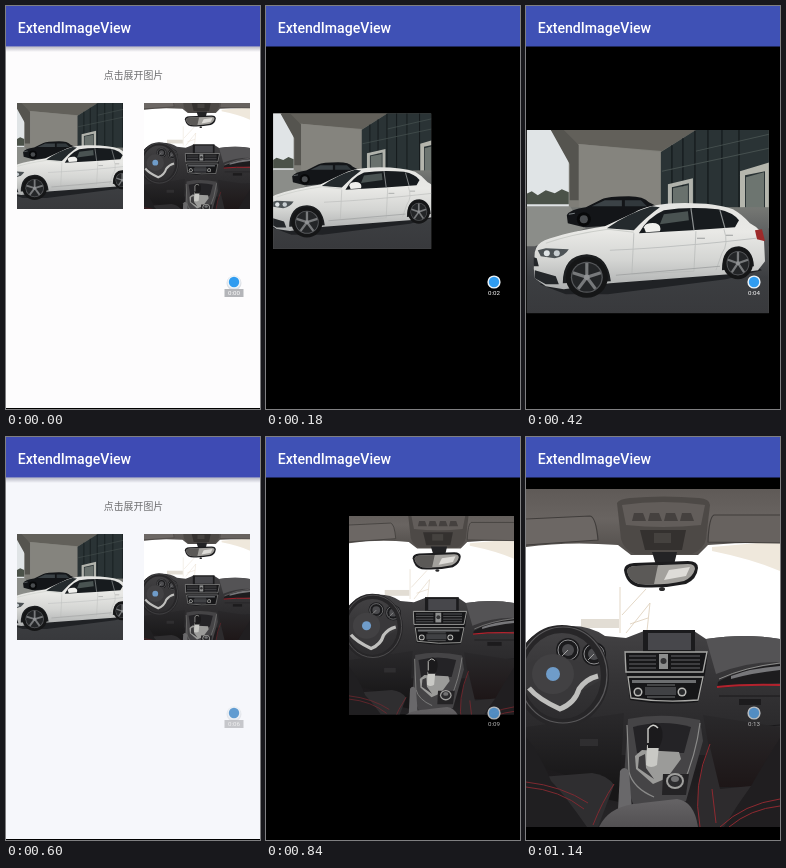
An HTML page with a canvas for the animation above (1.2 s loop, 254 by 403 pixels).

```html
<!DOCTYPE html>
<html lang="zh">
<head>
<meta charset="utf-8">
<style>
  html, body { margin: 0; width: 100%; height: 100%; overflow: hidden; background: #000; }
  canvas { display: block; width: 254px; height: 403px; }
</style>
</head>
<body>
<canvas id="stage"></canvas>
<script>
const W = 254, H = 403, STEP = 60, LOOP = 1200;
const canvas = document.getElementById('stage');
const ratio = window.devicePixelRatio || 1;
canvas.width = W * ratio;
canvas.height = H * ratio;
const c = canvas.getContext('2d');

function fill(color, d) {
  c.fillStyle = color;
  c.fill(new Path2D(d));
}
function line(color, width, d) {
  c.strokeStyle = color;
  c.lineWidth = width;
  c.stroke(new Path2D(d));
}
function rect(color, x, y, w, h) {
  c.fillStyle = color;
  c.fillRect(x, y, w, h);
}
function oval(color, x, y, rx, ry = rx, width = 0) {
  c.beginPath();
  c.ellipse(x, y, rx, ry, 0, 0, 7);
  c.fillStyle = c.strokeStyle = color;
  c.lineWidth = width;
  width ? c.stroke() : c.fill();
}
function fade(y0, y1, ...colors) {
  const g = c.createLinearGradient(0, y0, 0, y1);
  colors.forEach((color, i) => g.addColorStop(i / (colors.length - 1), color));
  return g;
}
function text(str, font, color, x, y, align = 'left') {
  c.font = font;
  c.fillStyle = color;
  c.textAlign = align;
  c.fillText(str, x, y);
}

function wheel(x, y, rx, ry) {
  oval('#151617', x, y, rx, ry);
  oval('#55575a', x, y, rx * .76, ry * .76);
  oval('#232527', x, y, rx * .7, ry * .7);
  for (let i = 0; i < 5; i++) {
    const a = i * Math.PI * .4 - 1.57;
    line('#77797b', rx * .15, `M${x} ${y}L${x + Math.cos(a) * rx * .7} ${y + Math.sin(a) * ry * .7}`);
  }
  oval('#909294', x, y, rx * .13);
}

function drawCar() {
  rect('#7f7e78', 0, 124, 244, 183);
  // sky, trees and canopy
  fill('#e0e4e6', 'M0 124H27L43 150V202H0Z');
  fill('#4b5249', 'M0 188L6 185 12 189 20 184 29 187 36 183 43 186V198H0Z');
  fill('#62605a', 'M25 124H170L136 145 52 138Z');
  fill('#55544f', 'M25 124H38L53 139V194H44V158Z');
  fill('#85847e', 'M53 138L136 146V204H53Z');
  // glass front
  fill('#2a3335', 'M135 146L170 124H244V240H135Z');
  for (const x of [146, 157, 169, 182, 196, 213])
    line('#151b1d', 1.3, `M${x} ${Math.max(124, 146 - (x - 135) * .63)}V205`);
  line('#46504f', 1, 'M136 165L244 142M170 145L244 128');
  fill('#b1b3ac', 'M142 178L167 172V200H163V177L146 181V200H142Z');
  fill('#69716d', 'M147 182L162 179V199H147Z');
  fill('#b5b6ad', 'M214 165L244 156V222H239V165L219 169V212H214Z');
  fill('#6d7570', 'M220 171L238 166V220H220Z');
  // ground
  rect(fade(200, 307, '#777975', '#56585a', '#3c3e41', '#38393c'), 0, 201, 244, 106);
  fill('#8b8d89', 'M0 200H44L60 222 9 240H0Z');
  // parked black car
  fill('#131518', 'M41 209Q44 203 60 201L76 193Q82 190 103 190 118 190 123 196L133 201V217L58 221 42 217Z');
  fill('#3b4246', 'M66 200L79 194H96V200Z');
  fill('#31383c', 'M99 194L115 194 121 200H99Z');
  oval('#08090a', 58, 213, 7);
  oval('#4a4d50', 58, 213, 4);
  line('#7a8083', 1, 'M43 208L49 207');
  // white car
  fill('#202225', 'M14 278L40 288 82 288 200 273 236 264 228 258 60 262Z');
  fill(fade(197, 282, '#e4e4e1', '#e9e9e6', '#d4d5d3', '#aeb0b0'),
    'M8 262L9 246Q11 237 19 234 40 226 79 220L109 206Q122 198 150 197 187 196 207 203 216 208 224 217 236 223 238 234L239 255 232 264 203 268 84 277 38 283 20 280 9 272Z');
  fill('#242a2d', 'M81 222Q102 207 126 200L134 201Q120 211 108 224Z');
  fill('#171b1e', 'M113 227Q122 211 138 204 163 200 192 203 207 206 213 214L209 221 166 224Z');
  line('#8c9091', 1.2, 'M165 202L168 224M194 204L199 222');
  fill('#4a5352', 'M138 208L162 205 163 214 134 218Z');
  fill('#f0f0ed', 'M118 221Q120 216 130 217 136 219 134 225L120 226Z');
  line('#b9bbba', .8, 'M108 227L106 268 168 265 170 225M198 223Q203 238 196 247L190 264');
  line('#bfc1c0', 1, 'M84 244Q150 241 230 232');
  line('#a5a7a7', 1.2, 'M90 269L194 260');
  line('#9a9d9d', 1, 'M171 232H179M200 229H207');
  line('#ccceca', 1, 'M20 237Q45 228 82 223L108 226');
  fill('#4d5356', 'M12 244L20 242 43 243Q39 250 29 252L15 250Z');
  oval('#dfe4e6', 21, 247, 3);
  oval('#c8ced1', 31, 247, 3);
  fill('#24272a', 'M8 251L11 252 13 260 8 260ZM9 264L30 270 33 278 20 278 9 272Z');
  fill('#9d2a2a', 'M229 224L236 223 239 235 231 233Z');
  fill('#1c1e20', 'M37 277Q37 249 61 248 82 249 85 275ZM196 264Q196 240 213 240 227 242 228 260Z');
  wheel(61, 271, 21, 20.5);
  wheel(212, 257, 15, 16);
}

function drawCabin() {
  rect(fade(280, 390, '#29282a', '#1d1b1d', '#272628'), 0, 52, 254, 338);
  // windscreen
  rect('#fff', 0, 96, 254, 115);
  fill('#efe8dc', 'M186 110L254 104V134Q226 122 186 114Z');
  line('#dccdb8', .8, 'M94 150V196M100 196L124 166 121 194M104 187L122 181M96 178L120 152');
  rect('#e2ddd4', 55, 182, 38, 9);
  // roof lining, visors and lamp console
  fill(fade(52, 112, '#5f5a57', '#696461', '#55514e'),
    'M0 52H254V106Q218 105 182 108L172 118H105L92 108Q42 104 0 110Z');
  fill('#6c6764', 'M0 82L64 79Q70 80 72 103L0 108Z');
  fill('#67625f', 'M254 78L188 78Q183 80 182 105L254 106Z');
  line('#403d3b', 1.2, 'M0 82L64 79Q70 80 72 103L0 108M254 78L188 78Q183 80 182 105L254 106');
  fill('#4d4946', 'M91 66Q93 62 104 61 137 58 173 61 184 62 184 68L180 102Q178 112 166 117H109Q98 113 95 102Z');
  fill('#625d5a', 'M96 68Q137 62 179 68L175 88Q137 92 100 88Z');
  for (let i = 0; i < 4; i++) fill('#45413f', `M${108 + i * 16} 76h9l3 8h-14Z`);
  fill('#34312f', 'M114 93H160L156 113H119Z');
  rect('#45423f', 128, 96, 17, 10);
  // mirror
  fill('#232325', 'M126 115H151L148 128H130Z');
  fill('#1c1c1e', 'M98 133Q98 127 108 126L162 124Q172 124 172 131 171 142 160 147 136 152 112 150 100 147 98 133Z');
  fill('#a3a19d', 'M101 134Q102 129 110 129L162 127Q169 127 169 132 167 140 158 144 136 149 113 147 103 144 101 134Z');
  fill('#5b5957', 'M101 134Q102 129 110 129L132 128 128 147 113 147Q103 144 101 134Z');
  fill('#dedcd8', 'M143 133L164 130 160 139 138 143Z');
  oval('#2a2a2b', 136, 152, 3, 2);
  // dashboard
  fill(fade(192, 300, '#434244', '#343335', '#29282a'),
    'M0 206Q8 195 33 190 60 186 79 199L100 201 118 194H168L180 202Q220 196 254 202V318H0Z');
  fill('#545355', 'M180 202Q220 196 254 202V225Q222 224 190 237Z');
  fill('#1d1c1e', 'M192 245Q215 231 254 227V246L191 251Z');
  fill('#77777a', 'M205 239Q225 231 254 229V233Q226 236 205 242Z');
  line('#a3a2a0', .8, 'M193 242Q219 230 254 226');
  line('#b3222d', 2, 'M191 250Q220 247 254 248');
  line('#1a191b', 1, 'M193 259H254M196 285Q224 292 254 288');
  rect('#1c1b1d', 213, 262, 22, 6);
  rect('#1b1b1d', 117, 193, 52, 24);
  rect('#47474b', 122, 196, 43, 17);
  // gauges
  for (const [x, y] of [[42, 213], [68, 217]]) {
    oval('#1b1b1d', x, y, 12);
    oval('#8e8e90', x, y, 10, 10, 1);
    oval('#4b4b4e', x, y, 6);
    line('#bcbcba', .8, `M${x} ${y}l-6 6`);
  }
  // vents and radio
  fill('#161618', 'M98 215L182 215 179 237 172 265Q138 269 104 263Z');
  line('#a6a6a4', 1.4, 'M99 215H181L177 235H100Z');
  for (let y = 219; y < 234; y += 4) line('#646568', 1.2, `M103 ${y}H130M145 ${y}H174`);
  rect('#8d8e8e', 133, 217, 9, 15);
  oval('#343436', 137.5, 224, 3);
  line('#aaaaa7', 1.3, 'M102 240H177L172 263Q138 266 105 261Z');
  rect('#6c6e70', 106, 243, 64, 3);
  rect('#404144', 119, 250, 31, 8);
  line('#8c8d8e', .8, 'M121 248H149M121 260H149');
  for (const x of [112, 156]) {
    oval('#babab7', x, 255, 4.5);
    oval('#292a2c', x, 255, 3);
  }
  // footwells
  fill(fade(280, 350, '#29282a', '#171617'), 'M0 290L98 276 93 365 70 360Q40 330 0 330Z');
  fill(fade(280, 350, '#29282a', '#1d1617'), 'M177 278L254 290V350H190Z');
  rect('#2f2e30', 54, 302, 18, 7);
  // console
  fill('#454446', 'M102 282Q137 275 174 283L177 304 160 364 107 367 98 340Z');
  line('#8a8a89', 1.2, 'M101 288L103 335Q107 351 128 360M174 286Q170 318 156 350');
  fill('#242326', 'M107 290Q137 282 165 290L158 316H111Z');
  fill('#9b9b99', 'M109 319L116 313 153 315 155 322 141 341 127 347 110 332Z');
  fill('#3c3b3d', 'M113 320L119 317 120 331 128 342 112 331Z');
  fill('#c9c9c5', 'M121 308H133L131 328Q125 332 120 328Z');
  fill('#1b1a1c', 'M121 291Q128 281 135 290 139 299 133 311H122Z');
  line('#d0d0cc', 1.4, 'M122 306L122 292Q127 285 132 291');
  fill('#242325', 'M137 337H163L160 358H136Z');
  oval('#a0a09e', 149, 344, 9, 8);
  oval('#2b2b2d', 149, 344, 7, 6);
  oval('#737374', 149, 342, 4, 3);
  // steering wheel
  fill('#39383a', 'M-5 230Q12 218 44 222L76 232 75 243 57 253Q45 272 34 273 16 268 0 250Z');
  line('#bfbfbd', 5, 'M3 251Q12 262 34 272 49 266 53 252 60 242 72 239');
  oval('#424143', 27, 237, 21, 20);
  oval('#272628', 36, 239, 43, 47, 8);
  oval('#59585a', 37, 238, 44, 48, 1.2);
  oval('#6f9cc9', 27, 237, 7);
  // seats
  fill('#2f2e30', 'M15 340L66 336Q81 338 88 348L72 390H0V350Z');
  fill('#201f21', 'M0 300Q15 318 25 344 38 357 61 390H0Z');
  line('#7f2930', 1, 'M0 345Q36 349 62 366M0 350Q34 353 58 372M88 347Q76 365 67 388');
  fill('#2d2b2d', 'M174 390Q166 350 184 310L194 352 225 349 240 390Z');
  fill('#201e20', 'M254 301Q238 326 225 349 211 368 198 390H254Z');
  line('#8f2930', 1, 'M184 307Q166 349 174 390M254 362Q218 367 194 390M254 369Q224 372 203 390M186 352L190 386');
  // handbrake and armrest
  fill('#69686a', 'M94 334Q98 328 103 334L106 373H92Z');
  fill(fade(361, 390, '#666466', '#525052'), 'M73 390Q82 371 107 367L151 362Q168 364 172 390Z');
}

// start and end are [x, y, w, h]; cx, cy, w, h describe the whole picture
const photos = [
  { draw: drawCar, cx: 122, cy: 215.5, w: 244, h: 183,
    start: [11, 97, 106, 106], end: [0, 126.5, 254, 190], from: .095, rate: .103 },
  { draw: drawCabin, cx: 127, cy: 221, w: 254, h: 338,
    start: [138, 97, 106, 106], end: [0, 52, 254, 338], from: .055, rate: .095 }
];

function drawPhoto(p, k) {
  const [x, y, w, h] = p.start.map((v, i) => v + (p.end[i] - v) * k);
  const s = Math.max(w / p.w, h / p.h);
  c.save();
  c.beginPath();
  c.rect(x, y, w, h);
  c.clip();
  c.translate(x + w / 2, y + h / 2);
  c.scale(s, s);
  c.translate(-p.cx, -p.cy);
  p.draw();
  c.restore();
}

function drawHeader(list) {
  rect(list ? '#3e4bb4' : '#3f51b5', 0, 0, W, 40.5);
  if (list) rect(fade(40, 46, 'rgba(40,40,70,.35)', 'rgba(40,40,70,0)'), 0, 40.5, W, 5.5);
  text('ExtendImageView', '500 14.1px Roboto, sans-serif', '#fff', 11.7, 26.5);
}

function drawTimer(t, list, second) {
  c.globalAlpha = second ? .72 : 1;
  if (list) {
    oval('#dcdfe5', 228, 277, 7.5);
    rect('#b4b5b9', 218.5, 283, 19, 8);
  }
  oval('#eef4f8', 228, 276, 6.6);
  oval(second ? '#2b7cc4' : '#309cf0', 228, 276, 5.2);
  const label = '0:' + String(Math.floor(t * .01141)).padStart(2, '0');
  text(label, '6.2px Roboto, sans-serif', '#fff', 228, 289.3, 'center');
  c.globalAlpha = 1;
}

function frame(now) {
  const index = Math.floor(now % LOOP / STEP);
  const second = index >= 10, step = index % 10, list = step === 0;
  c.setTransform(ratio, 0, 0, ratio, 0, 0);
  rect(list ? (second ? '#f6f7fb' : '#fdfcfd') : '#000', 0, 0, W, H);
  if (list) {
    rect('#000', 0, 402, W, 1);
    text('点击展开图片', '9.88px "Noto Sans CJK SC", "Noto Sans CJK", sans-serif', '#6c6c6e', 127.5, 72.5, 'center');
    photos.forEach(p => drawPhoto(p, 0));
  } else {
    const p = photos[+second];
    const u = step === 9 ? 1 : p.from + p.rate * step;
    drawPhoto(p, (1 - Math.cos(Math.PI * u)) / 2);
  }
  drawHeader(list);
  drawTimer(index * STEP, list, second);
  requestAnimationFrame(frame);
}
const begin = performance.now();
requestAnimationFrame(now => frame(Math.max(0, now - begin)));
</script>
</body>
</html>
```
